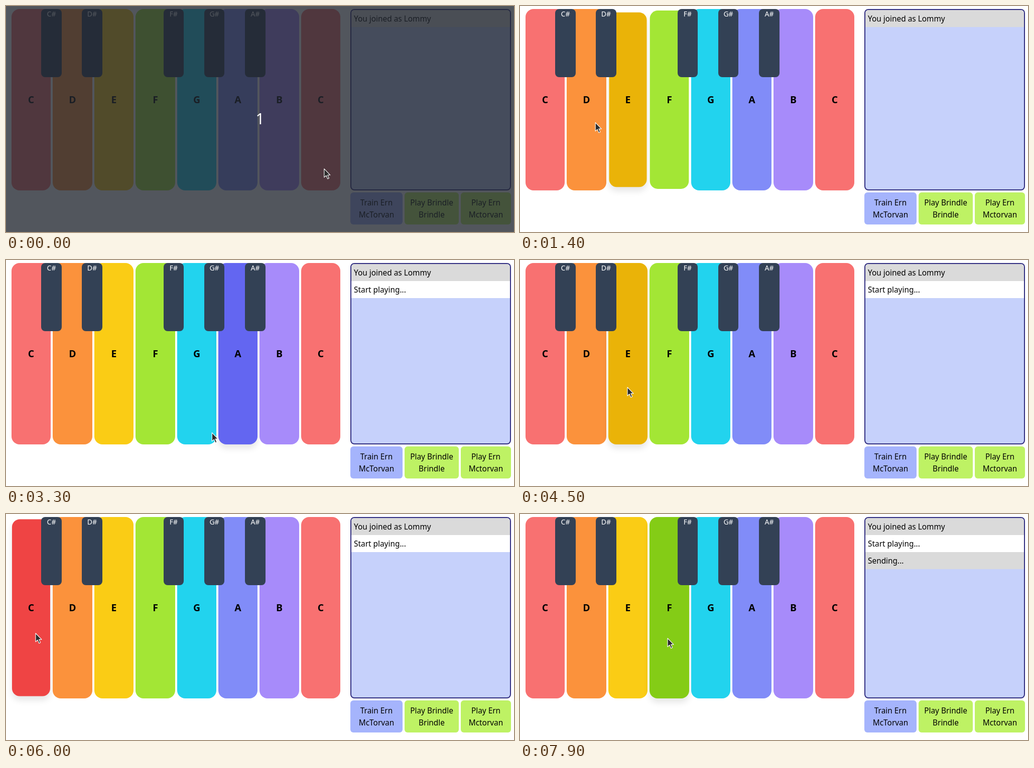
Animation of 1012x451 px, one loop 8 s. Source, as an HTML page with a canvas:

```html
<!DOCTYPE html>
<html lang="en">
<head>
<meta charset="utf-8">
<title>Piano</title>
<style>
  html, body { margin: 0; width: 100%; height: 100%; overflow: hidden; background: #fff; }
  canvas, svg { position: absolute; left: 0; top: 0; width: 1012px; height: 451px; }
  text { font: 15.4px "Noto Sans", sans-serif; }
  .mid { text-anchor: middle; }
  .key { font-size: 19.4px; font-weight: 700; }
  .sharp { font-size: 14px; fill: #fff; }
  .count { font-size: 30px; fill: #fff; }
</style>
</head>
<body>
<canvas id="stage" width="1012" height="451"></canvas>
<svg viewBox="0 0 1012 451">
  <g id="labels"></g>
  <g id="cover">
    <rect width="1012" height="451" fill="rgb(34,39,48)" fill-opacity=".78"/>
    <text class="mid count" x="506" y="236">1</text>
  </g>
  <path id="cursor" d="M0 0V17L4 13.4L6.8 20L9.6 18.8L6.8 12.4H12Z"
    fill="#2b2b2b" stroke="#fff" stroke-width="1.1" stroke-linejoin="round"/>
</svg>
<script>
const LOOP = 8000;
const COVER_END = 300, START_AT = 3000, SEND_AT = 7900;
const HOVER_LAG = 40, DIP_TIME = 280, DIP = 0.04;
const TUNE = 'E D C E D C C C C D. D. D';
const TUNE_AT = 3638, BEAT = 288, DOT = 102;
const KEY_Y = 6, KEY_H = 362;

const get = id => document.getElementById(id);
const ctx = get('stage').getContext('2d');

// Left edge and width of a slot, snapped to whole pixels
function snap(left, width) {
  const x = Math.round(left);
  return { x, w: Math.round(left + width) - x };
}

// name, colour, hovered colour
const keys = [
  ['C', '#f87171', '#ef4444'], ['D', '#fb923c', '#f97316'],
  ['E', '#facc15', '#eab308'], ['F', '#a3e635', '#84cc16'],
  ['G', '#22d3ee', '#06b6d4'], ['A', '#818cf8', '#6366f1'],
  ['B', '#a78bfa', '#8b5cf6'], ['C', '#f87171', '#ef4444']
].map(([name, color, hot], i) => ({ name, color, hot, ...snap(11 + 82.4 * i, 78.4) }));

const sharps = [['C#', 0], ['D#', 1], ['F#', 3], ['G#', 4], ['A#', 5]]
  .map(([name, slot]) => ({ name, ...snap(70.1 + 81.2 * slot, 40.5) }));

const buttons = [
  { x: 686, w: 104, color: '#a5b4fc', hot: '#818cf8', lines: ['Train Ern', 'McTorvan'] },
  { x: 794, w: 108, color: '#bef264', hot: '#a3e635', lines: ['Play Brindle', 'Brindle'] },
  { x: 906, w: 100, color: '#bef264', hot: '#a3e635', lines: ['Play Ern', 'Mctorvan'] }
];

const messages = [
  { text: 'You joined as Lommy', at: 0 },
  { text: 'Start playing...', at: START_AT },
  { text: 'Sending...', at: SEND_AT }
];

// Evenly spaced presses from one key to a neighbour further along
function sweep(at, from, to) {
  const step = Math.sign(to - from);
  return Array.from({ length: Math.abs(to - from) + 1 },
    (_, i) => ({ at: at + 130 * i, key: from + step * i }));
}

let beat = TUNE_AT;
const notes = TUNE.split(' ').map(note => {
  const at = beat;
  beat += BEAT + (note.endsWith('.') ? DOT : 0);
  return { at, key: 'CDEFGAB'.indexOf(note[0]) };
});
const hits = [...sweep(640, 7, 0), ...sweep(1845, 6, 7), ...notes];

// Pointer stops: time, x, y
const restOn = (t, key) => [t, 59 + 77.5 * key, 238 + 8 * key];
const path = [
  [0, 634, 325], [900, 487, 225], [1550, 50, 235], [1900, 597, 218],
  [2500, 738, 402], [START_AT, 738, 402], [3300, 411, 345],
  ...notes.flatMap(n => [restOn(n.at - HOVER_LAG, n.key), restOn(n.at + 80, n.key)]),
  restOn(7350, 1), [7700, 294, 248], [LOOP, 294, 248]
];

function pointer(t) {
  const i = Math.max(1, path.findIndex(p => p[0] >= t));
  const [t0, x0, y0] = path[i - 1], [t1, x1, y1] = path[i];
  const u = Math.max(0, (t - t0) / (t1 - t0));
  return { x: x0 + (x1 - x0) * u, y: y0 + (y1 - y0) * u };
}

const inside = (p, x, y, w, h) => p.x >= x && p.x < x + w && p.y >= y && p.y < y + h;

function keyScale(index, t) {
  let dip = 0;
  for (const { at, key } of hits) {
    const u = (t - at) / DIP_TIME;
    if (key === index && u > 0 && u < 1) dip = Math.max(dip, Math.sin(Math.PI * u));
  }
  return 1 - DIP * dip;
}

function box(x, y, w, h, r, color) {
  ctx.fillStyle = color;
  ctx.beginPath();
  ctx.roundRect(x, y, w, h, r);
  ctx.fill();
}

function drawKey(key, scale, hovered) {
  ctx.save();
  ctx.translate(key.x + key.w / 2, KEY_Y + KEY_H / 2);
  ctx.scale(scale, scale);
  if (hovered) {
    ctx.shadowColor = 'rgba(0,0,0,.1)';
    ctx.shadowBlur = 13;
    ctx.shadowOffsetY = 8;
  }
  box(-key.w / 2, -KEY_H / 2, key.w, KEY_H, 16, hovered ? key.hot : key.color);
  ctx.restore();
}

function drawChat(t) {
  box(686, 6, 320, 362, 8, '#312e81');
  box(688, 8, 316, 358, 6, '#c6d1fb');
  messages.forEach((m, i) => {
    if (t >= m.at) box(688, 8 + 34 * i, 316, 34, i ? 0 : [6, 6, 0, 0], i % 2 ? '#fff' : '#dadada');
    m.node.style.display = t >= m.at ? '' : 'none';
  });
}

function draw(t) {
  const covered = t < COVER_END;
  const spot = covered ? { x: -1, y: -1 } : pointer(t - HOVER_LAG);
  ctx.clearRect(0, 0, 1012, 451);
  keys.forEach((k, i) => drawKey(k, keyScale(i, t), inside(spot, k.x, KEY_Y, k.w, KEY_H)));
  sharps.forEach(s => box(s.x, 6, s.w, 136, 8, '#334155'));
  drawChat(t);
  buttons.forEach(b => box(b.x, 372, b.w, 64, 6, inside(spot, b.x, 372, b.w, 64) ? b.hot : b.color));

  get('cover').style.display = covered ? '' : 'none';
  const { x, y } = pointer(t);
  get('cursor').setAttribute('transform', `translate(${x} ${y})`);
}

const label = (text, x, y, cls = '') => `<text class="${cls}" x="${x}" y="${y}">${text}</text>`;

get('labels').innerHTML = [
  ...messages.map((m, i) => label(m.text, 693, 31 + 34 * i)),
  ...keys.map(k => label(k.name, k.x + k.w / 2, 194, 'mid key')),
  ...sharps.map(s => label(s.name, s.x + s.w / 2, 21, 'mid sharp')),
  ...buttons.flatMap(b => b.lines.map((line, i) => label(line, b.x + b.w / 2, 398 + 24 * i, 'mid')))
].join('');
messages.forEach((m, i) => { m.node = get('labels').children[i]; });

const start = performance.now();
function tick() {
  draw((performance.now() - start) % LOOP);
  requestAnimationFrame(tick);
}
tick();
</script>
</body>
</html>
```
